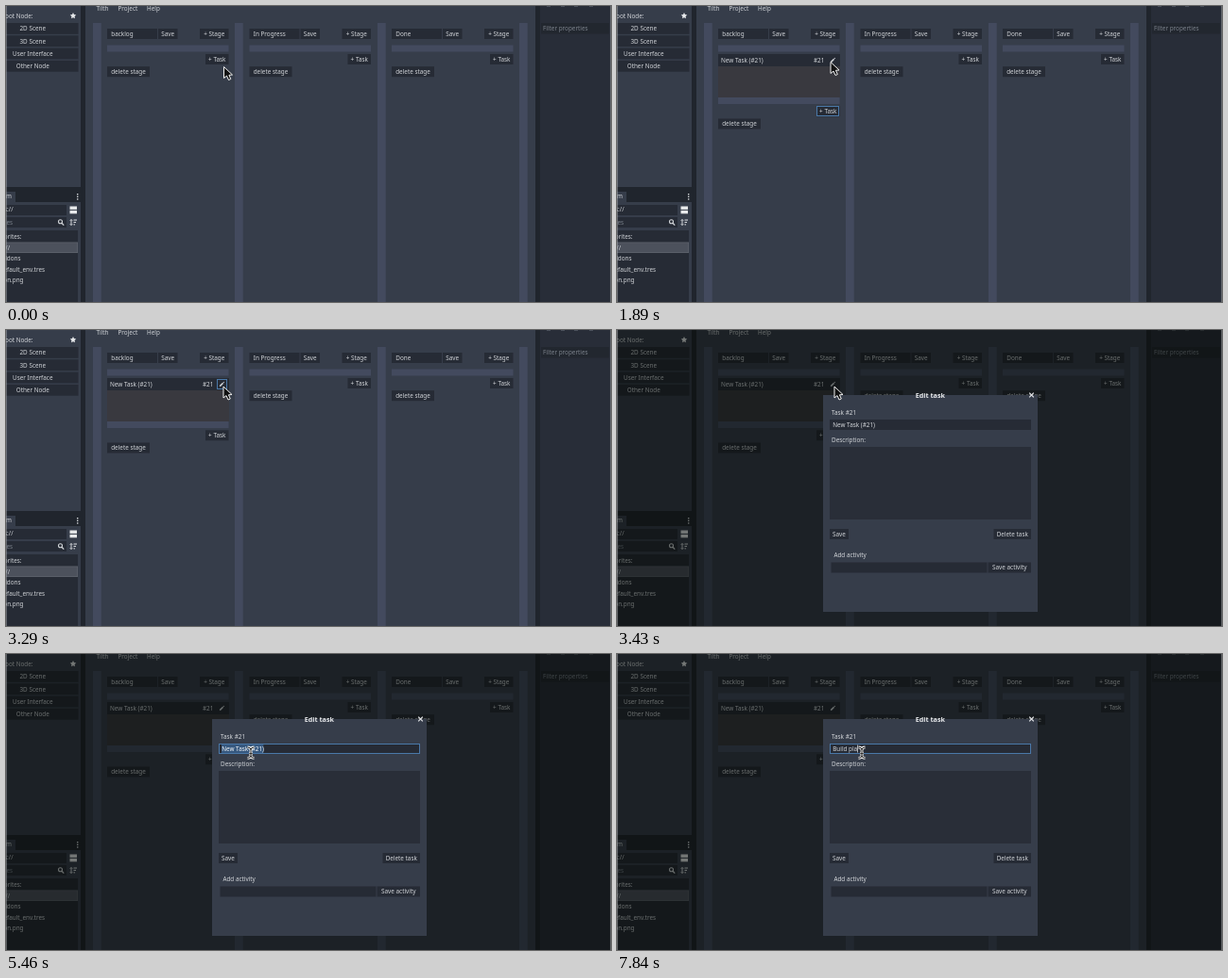
Animation of 640x314 px, one loop 8 s. Source, as an HTML page with a canvas:

```html
<!DOCTYPE html>
<html lang="en">
<head>
<meta charset="utf-8">
<title>Task board</title>
<style>
html, body { margin: 0; width: 640px; height: 314px; overflow: hidden; background: #20252d; }
canvas { display: block; }
</style>
</head>
<body>
<canvas id="stage" width="640" height="314"></canvas>
<script>
const ctx = document.getElementById('stage').getContext('2d');
const LOOP = 8000, STEP = 70;
const BASE = '#363d4a', DARK = '#262b35', GAP = '#20252d', STRIP = '#434a5e';
const INK = '#d2d5d9', BRIGHT = '#e6e8ea', FAINT = '#7b818b', ACCENT = '#4a78a8';
const OPEN = 3430;

// Pointer positions: time, x, y
const pointerPath = [
  [0, 230.5, 64.5], [210, 230.5, 64.5], [560, 227.5, 59.5], [630, 227.5, 59.5], [700, 227, 59],
  [1190, 227, 59], [1540, 226, 59.5], [2170, 226, 59.5], [2310, 223.5, 86], [2450, 221.5, 102],
  [2520, 223.5, 100], [2730, 225.5, 84], [3010, 229, 60], [3290, 230, 60], [3640, 230, 60],
  [3850, 216, 78], [4060, 232, 97], [4340, 259, 104.7]
];
// Times at which one more letter is typed
const typing = [5740, 6230, 6440, 6720, 6930, 7070, 7420, 7630, 7840];

function pointerAt(t) {
  const i = pointerPath.findIndex(p => p[0] > t);
  if (i < 0) return pointerPath.at(-1).slice(1);
  const [t0, x0, y0] = pointerPath[i - 1], [t1, x1, y1] = pointerPath[i];
  const k = (t - t0) / (t1 - t0);
  return [x0 + (x1 - x0) * k, y0 + (y1 - y0) * k];
}

function box(x, y, w, h, fill) {
  ctx.fillStyle = fill;
  ctx.fillRect(x, y, w, h);
}

function outline(x, y, w, h) {
  ctx.strokeStyle = ACCENT;
  ctx.lineWidth = 1;
  ctx.strokeRect(x + 0.5, y + 0.5, w - 1, h - 1);
}

function setFont(size = 6.35, weight = 400) {
  ctx.font = `${weight} ${size}px "Noto Sans", sans-serif`;
}

// y is the middle of the capitals
function label(text, x, y, align = 'left', color = INK) {
  ctx.fillStyle = color;
  ctx.textAlign = align;
  ctx.fillText(text, x, y + 2.3);
}

function button(text, x, y, w, h = 11) {
  box(x, y, w, h, DARK);
  label(text, x + w / 2, y + h / 2, 'center');
}

function line(points, color, width) {
  ctx.beginPath();
  points.forEach(([x, y]) => ctx.lineTo(x, y));
  ctx.strokeStyle = color;
  ctx.lineWidth = width;
  ctx.stroke();
}

function star(cx, cy, r) {
  ctx.beginPath();
  for (let i = 0; i < 10; i++) {
    const a = i * Math.PI / 5 - Math.PI / 2, d = i % 2 ? r * 0.5 : r;
    ctx.lineTo(cx + d * Math.cos(a), cy + d * Math.sin(a));
  }
  ctx.fillStyle = BRIGHT;
  ctx.fill();
}

function drawSceneDock() {
  box(0, 0, 79, 192, BASE);
  label('Create Root Node:', 28.5, 10.5, 'right');
  star(71, 10.5, 3.4);
  ['2D Scene', '3D Scene', 'User Interface', 'Other Node'].forEach((name, i) =>
    button(name, -20, 18 + i * 13.3, 96.5, 11.8));
}

function drawFileDock() {
  box(0, 197, 10, 12, BASE);
  box(0, 208, 79, 106, BASE);
  label('FileSystem', 6, 202, 'right');
  for (let i = 0; i < 3; i++) box(75, 199 + i * 2.6, 1.4, 1.4, INK);

  box(0, 211, 64, 11, DARK);
  label('res://', 7.5, 216, 'right');
  box(67.5, 212.5, 7.5, 3.4, BRIGHT);
  box(67.5, 216.9, 7.5, 3.4, BRIGHT);

  box(0, 224, 64, 11, DARK);
  label('Search files', 7, 229.5, 'right', FAINT);
  ctx.beginPath();
  ctx.arc(57.5, 228.7, 2, 0, 7);
  ctx.strokeStyle = INK;
  ctx.lineWidth = 1.1;
  ctx.stroke();
  line([[59, 230.2], [61.2, 232.6]], INK, 1.3);
  line([[69, 226.5], [69, 232.5]], INK, 1);
  line([[67.6, 228], [69, 226.4], [70.4, 228]], INK, 0.8);
  line([[67.6, 231], [69, 232.6], [70.4, 231]], INK, 0.8);
  [3.5, 2.5, 1.5].forEach((w, i) => box(71.5, 226.5 + i * 2.4, w, 1.1, INK));

  box(0, 238, 76, 76, DARK);
  box(0, 250.5, 76, 11.5, '#5d626c');
  box(0, 251.3, 75.3, 9.9, '#4c515c');
  label('Favorites:', 16.5, 245, 'right');
  label('res://', 4, 256.5, 'right');
  label('addons', 15.5, 268, 'right');
  label('default_env.tres', 41, 279.5, 'right');
  label('icon.png', 18.5, 291, 'right');
}

function drawInspector() {
  box(565, 0, 74, 314, '#282d38');
  [572, 587, 601, 617].forEach(x => box(x, 0, 4, 1, '#4a505b'));
  box(566, 18, 72, 11.5, '#22272f');
  label('Filter properties', 568, 23.7, 'left', FAINT);
}

function drawPencil() {
  line([[226.2, 59.6], [229.6, 56.2]], INK, 1.5);
  line([[230, 55.8], [230.6, 55.2]], INK, 1.5);
}

function drawCard(focused) {
  box(107, 51, 129, 46, '#39393f');
  box(107, 51, 129, 13, DARK);
  label('New Task (#21)', 110, 57.3);
  label('#21', 208, 57.3);
  drawPencil();
  if (focused) outline(223, 52, 11, 11);
  box(107, 97, 128.5, 7, STRIP);
}

function drawStage(name, i, t) {
  const x = 107 + i * 150.5, hasTask = i === 0 && t >= 1890;
  const shift = hasTask ? 55.3 : 0;
  box(x, 24, 53, 11, DARK);
  label(name, x + 4.3, 29.5);
  button('Save', x + 54, 24, 20.5);
  button('+ Stage', x + 98, 24, 30.5);
  box(x, 41.5, 128.5, 7, STRIP);
  if (hasTask) drawCard(t >= 3220 && t < OPEN);
  button('+ Task', x + 104, 51 + shift, 24.5);
  if (i === 0 && t >= 1680 && t < 3220) outline(211, Math.round(51 + shift), 24, 11);
  button('delete stage', x, 64.2 + shift, 45);
}

function drawBoard(t) {
  box(84, 0, 476, 314, BASE);
  label('Tilth', 95.5, 3);
  label('Project', 118.5, 3);
  label('Help', 149, 3);
  [92, 242, 393, 543].forEach(x => box(x, 18, 8.7, 296, STRIP));
  ['backlog', 'In Progress', 'Done'].forEach((name, i) => drawStage(name, i, t));
}

function drawNameField(t) {
  const x = 228.2, typed = typing.filter(at => at <= t).length;
  const text = typed ? 'Build pla'.slice(0, typed) : 'New Task (#21)';
  const selecting = !typed && t >= 4690;
  box(225, 95, 213, 11, DARK);
  if (t >= 4340) outline(225, 95, 213, 11);
  if (selecting) {
    const [from, to] = t < 4760 ? [257, 260] : t < 4900 ? [257, 264] : t < 4970 ? [228, 264] : [228, 272.3];
    box(from, 96, to - from, 9, '#36587f');
  }
  label(text, x, 100.5, 'left', selecting ? '#f4f6f8' : INK);
  if (typed) box(x + ctx.measureText(text).width, 96.5, 0.8, 8, INK);
}

function drawDialog(t) {
  box(0, 0, 640, 314, 'rgba(2, 7, 2, 0.5)');
  box(218, 69, 227, 230, BASE);
  setFont(7.2, 700);
  label('Edit task', 331.3, 69.3, 'center', BRIGHT);
  setFont();
  line([[436.2, 66.7], [440.8, 71.3]], BRIGHT, 1.2);
  line([[440.8, 66.7], [436.2, 71.3]], BRIGHT, 1.2);

  label('Task #21', 227, 87.3);
  drawNameField(t);
  label('Description:', 227, 116.5);
  box(225, 124, 213, 77, '#292e38');
  button('Save', 225, 211, 20);
  button('Delete task', 398.5, 211, 39.5);
  label('Add activity', 229.4, 239);
  box(226.5, 246.5, 165, 11, DARK);
  button('Save activity', 392.5, 246.5, 45.5);
}

function drawWindowEdge() {
  box(0, 0, 0.5, 314, '#a4a7ab');
  box(639.5, 0, 0.5, 314, '#a4a7ab');
}

const arrow = new Path2D('M0 0V12L3 9.6 5 14 7.3 13 5.4 8.8 9 8.5Z');
const beam = new Path2D('M-3.5 -5.7Q0 -5.7 0 -3Q0 -5.7 3.5 -5.7M0 -3V3M-3.5 5.7Q0 5.7 0 3Q0 5.7 3.5 5.7M-1.8 1H1.8');

function drawPointer(t) {
  const [x, y] = pointerAt(t);
  const overField = t >= OPEN && y > 95 && y < 106 && x > 225;
  ctx.save();
  ctx.translate(x, y);
  ctx.lineJoin = 'round';
  if (overField) {
    ctx.strokeStyle = '#f2f2f2';
    ctx.lineWidth = 2.8;
    ctx.stroke(beam);
    ctx.strokeStyle = '#111';
    ctx.lineWidth = 0.9;
    ctx.stroke(beam);
  } else {
    ctx.fillStyle = '#111';
    ctx.fill(arrow);
    ctx.strokeStyle = '#f2f2f2';
    ctx.lineWidth = 1;
    ctx.stroke(arrow);
  }
  ctx.restore();
}

function draw(now) {
  const t = Math.floor(now % LOOP / STEP) * STEP;
  box(0, 0, 640, 314, GAP);
  setFont();
  drawSceneDock();
  drawFileDock();
  drawInspector();
  drawBoard(t);
  if (t >= OPEN) drawDialog(t);
  drawWindowEdge();
  drawPointer(t);
  requestAnimationFrame(draw);
}
requestAnimationFrame(draw);
</script>
</body>
</html>
```
